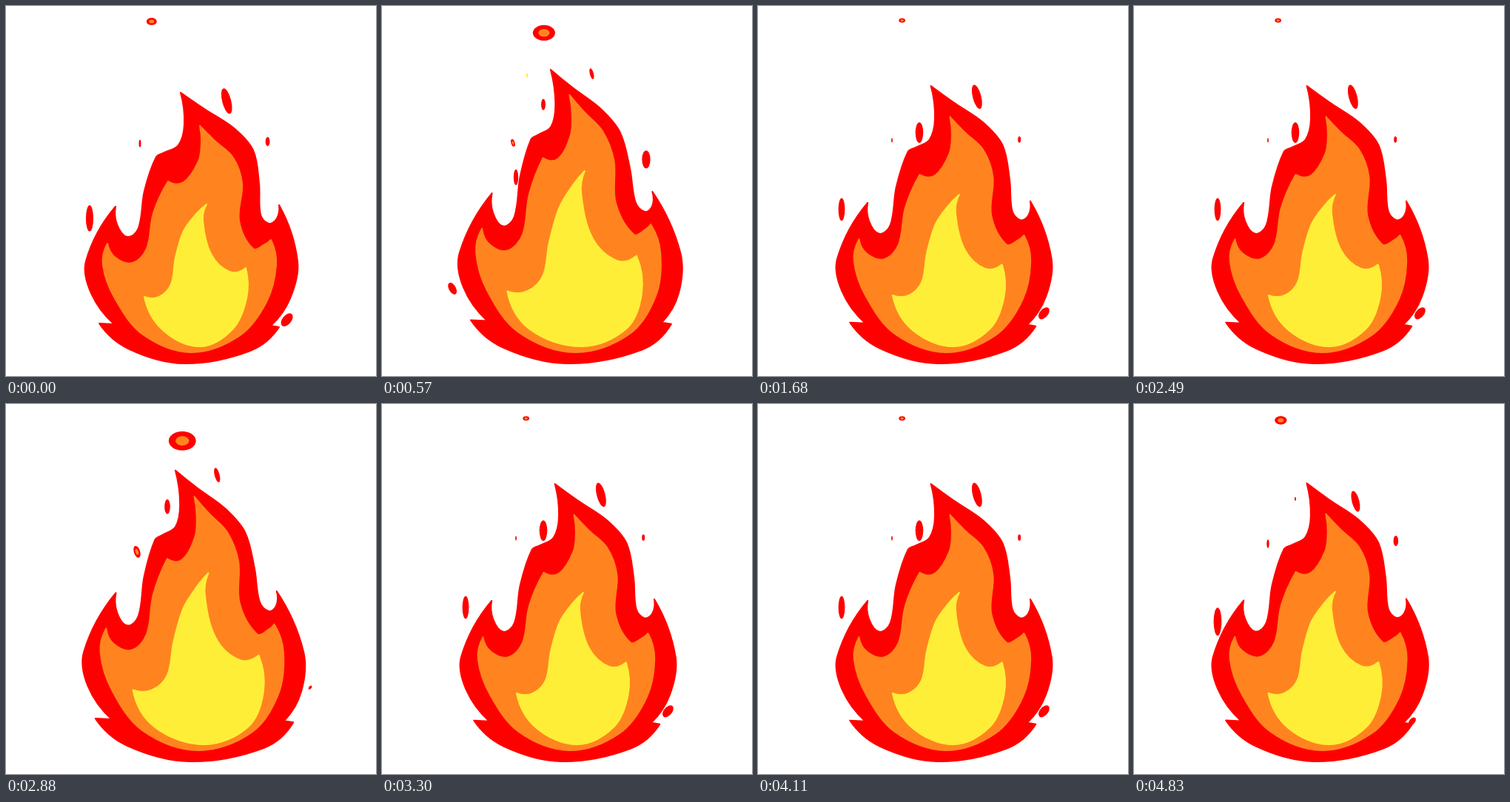
Recreate the animation shown at these times as an HTML page with a canvas. Size 500 px wide and 500 px high, loop 4860 ms.

```html
<!DOCTYPE html>
<html lang="en">
<head>
<meta charset="utf-8">
<title>Flame</title>
<style>
  html, body { margin: 0; width: 100%; height: 100%; overflow: hidden; background: #fff; }
  canvas { display: block; width: 500px; height: 500px; }
</style>
</head>
<body>
<canvas id="stage" width="500" height="500"></canvas>
<script>
const RED = '#ff0000', ORANGE = '#ff841f', YELLOW = '#ffee38';
const TICK = 30, CYCLE = 27, PEAK = 19;
const ctx = document.getElementById('stage').getContext('2d');

// Each layer has one resting outline; * marks a sharp point.
// At full height the tip rises by `lift`, and the sides spread away from `axis` below `pivot`.
const layers = [
  { color: RED, lift: 31, bend: 1, spread: 0.3, pivot: 0.52, axis: 180, outline:
    `236,117* 268,139 308,165 334,195 342,240 344,282 355,294 366,287 369,269* 394,345
     384,395 358,432* 369,434* 330,466 240,483 165,463 126,429* 146,430* 115,388 108,345
     148,271* 150,295 164,312 179,300 187,250 203,204 214,198 233,188 241,160` },
  { color: ORANGE, lift: 42, bend: 1, spread: 0.3, pivot: 0.6, axis: 190, outline:
    `262,162* 282,182 307,205 319,240 315,290 334,328 350,322 358,316* 365,350 352,400
     315,446 250,468 185,444 147,395 131,350 137,321* 148,340 171,347 190,328 199,280
     219,237* 240,238 260,210 264,185` },
  { color: YELLOW, lift: 45, bend: 1.7, spread: 0.33, pivot: 1.3, axis: 243, outline:
    `271,268* 266,290 277,335 302,359 324,354* 325,395 306,437 262,460 212,438 187,393*
     207,393 223,376 229,340 240,304 257,281` }
];

// Sparks break off at (x, y), slow down along (dx, -rise) and shrink away.
const sparks = [
  { born: 13, life: 18, x: 250, y: 58, dx: -56, rise: 39, w: 40, h: 28, core: ORANGE },
  { born: 24, life: 30, x: 302, y: 138, dx: -20, rise: 50, w: 13, h: 38, tilt: -0.25 },
  { born: 0, life: 28, x: 218, y: 178, rise: 50, w: 13, h: 34 },
  { born: 17, life: 14, x: 181, y: 250, rise: 70, w: 7, h: 24 },
  { born: 16, life: 16, x: 359, y: 222, dx: -6, rise: 43, w: 13, h: 28 },
  { born: 24, life: 14, x: 113, y: 310, rise: 60, w: 12, h: 42 },
  { born: 25, life: 20, x: 372, y: 434, dx: 40, rise: 52, w: 13, h: 22, tilt: 0.7 },
  { born: 15, life: 11, x: 104, y: 408, dx: -15, rise: 44, w: 13, h: 24, tilt: -0.5 },
  { born: 14, life: 9, x: 177, y: 205, rise: 25, w: 9, h: 18, tilt: -0.3, core: ORANGE },
  { born: 16, life: 6, x: 196, y: 102, rise: 11, w: 4, h: 10, color: YELLOW }
];

for (const layer of layers) {
  layer.points = layer.outline.trim().split(/\s+/).map(text => {
    const [x, y] = text.split(',').map(parseFloat);
    return { x, y, sharp: text.endsWith('*') };
  });
  const ys = layer.points.map(p => p.y);
  layer.top = Math.min(...ys);
  layer.bottom = Math.max(...ys);
}

// 0 at rest, 1 at the peak: a quick start that slows, then a fall that speeds up.
function heightAt(tick) {
  const u = tick < PEAK ? tick / PEAK : (CYCLE - tick) / (CYCLE - PEAK);
  return u ** 0.55;
}

function stretch({ points, top, bottom, lift, bend, spread, pivot, axis }, amount) {
  return points.map(p => {
    const h = (bottom - p.y) / (bottom - top);
    return {
      x: p.x + amount * spread * (pivot - h) * (p.x - axis),
      y: p.y - amount * lift * h ** bend,
      sharp: p.sharp
    };
  });
}

// Closed curve through the points; next to a sharp point the bend comes from the other end.
function curve(pts) {
  const n = pts.length, path = new Path2D();
  const handle = (i, len) => {
    const a = pts[(i + n - 1) % n], b = pts[(i + 1) % n];
    const k = len / Math.hypot(b.x - a.x, b.y - a.y);
    return [pts[i].x + (b.x - a.x) * k, pts[i].y + (b.y - a.y) * k];
  };
  path.moveTo(pts[0].x, pts[0].y);
  pts.forEach((p, i) => {
    const j = (i + 1) % n, q = pts[j];
    const len = Math.hypot(q.x - p.x, q.y - p.y);
    if (p.sharp && q.sharp) path.lineTo(q.x, q.y);
    else if (p.sharp) path.quadraticCurveTo(...handle(j, -len / 2), q.x, q.y);
    else if (q.sharp) path.quadraticCurveTo(...handle(i, len / 2), q.x, q.y);
    else path.bezierCurveTo(...handle(i, len / 3), ...handle(j, -len / 3), q.x, q.y);
  });
  path.closePath();
  return path;
}

function drawLayer(layer, tick) {
  const path = curve(stretch(layer, heightAt(tick)));
  ctx.fillStyle = ctx.strokeStyle = layer.color;
  ctx.fill(path);
  ctx.stroke(path);
}

function blob(x, y, w, h, tilt, color) {
  ctx.fillStyle = color;
  ctx.beginPath();
  ctx.ellipse(x, y, w / 2, h / 2, tilt, 0, 2 * Math.PI);
  ctx.fill();
}

function drawSpark({ born, life, x, y, dx = 0, rise, w, h, tilt = 0, color = RED, core }, tick) {
  const u = ((tick - born + CYCLE) % CYCLE) / life;
  if (u >= 1) return;
  const move = 1 - (1 - u) ** 2;
  const size = Math.min(1, u * 12) * (1 - u) ** 0.7;
  const cx = x + dx * move, cy = y - rise * move;
  blob(cx, cy, w * size, h * size, tilt, color);
  if (core) blob(cx, cy, w * size / 2, h * size / 2, tilt, core);
}

function draw(tick) {
  ctx.clearRect(0, 0, 500, 500);
  ctx.lineJoin = 'round';
  ctx.lineWidth = 2;
  for (const layer of layers) drawLayer(layer, tick);
  for (const spark of sparks) drawSpark(spark, tick);
}

const start = performance.now();
function loop() {
  draw(Math.floor((performance.now() - start) / TICK) % CYCLE);
  requestAnimationFrame(loop);
}
loop();
</script>
</body>
</html>
```
